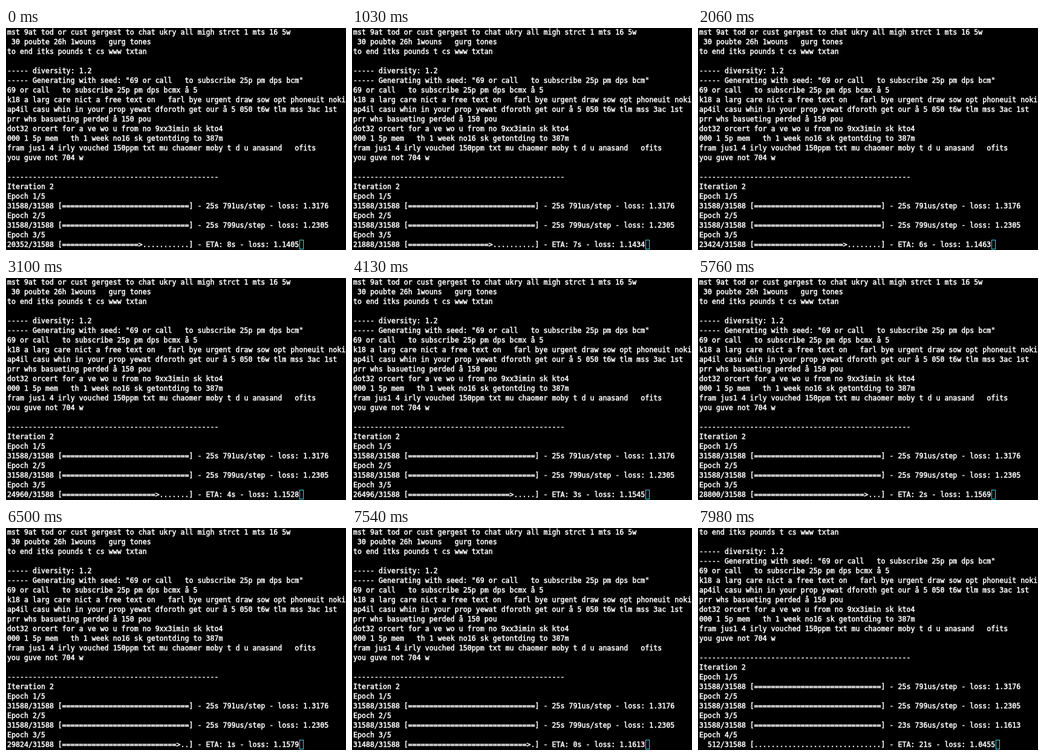
An HTML page for the animation above (8000 ms loop, 562 by 368 pixels).

```html
<!DOCTYPE html>
<html lang="en">
<head>
<meta charset="utf-8">
<title>Training log</title>
<style>
html, body { margin: 0; width: 100%; height: 100%; overflow: hidden; background: #000; }
#log {
  position: absolute; left: 2px; top: -1px; margin: 0; color: #fff;
  font: 11.627px/16px "DejaVu Sans Mono", monospace;
  font-variant-ligatures: none;
  -webkit-text-stroke: 0.5px #fff;
}
#cursor {
  position: absolute; top: 351px; width: 7px; height: 16px;
  box-sizing: border-box; border: 1px solid #36dce6;
}
</style>
</head>
<body>
<pre id="log"></pre>
<div id="cursor"></div>
<script>
const LOOP = 8000, TICK = 147.9, LEAD = 12;
const ROWS = 23, CELL = 7, LEFT = 2;
const SAMPLES = 31588, BATCH = 128, BATCHES = Math.ceil(SAMPLES / BATCH), WIDTH = 30;

// [tick, batches done, loss]
const progress = [
  [0, 159, 1.1405], [14, 183, 1.1463], [21, 195, 1.1528], [34, 217, 1.1560],
  [44, 233, 1.1579], [51, 246, 1.1613], [54, 251, 1.0455]
];

const history = `mst 9at tod or cust gergest to chat ukry all migh strct 1 mts 16 5w
 30 poubte 26h 1wouns   gurg tones
to end itks pounds t cs www txtan

----- diversity: 1.2
----- Generating with seed: "69 or call   to subscribe 25p pm dps bcm"
69 or call   to subscribe 25p pm dps bcmx å 5
k18 a larg care nict a free text on   farl bye urgent draw sow opt phoneuit noki
ap4il casu whin in your prop yewat dforoth get our å 5 050 t6w tlm mss 3ac 1st
prr whs basueting perded å 150 pou
dot32 orcert for a ve wo u from no 9xx3imin sk kto4
000 1 5p mem   th 1 week no16 sk getontding to 387m
fram jus1 4 irly vouched 150ppm txt mu chaomer moby t d u anasand   ofits
you guve not 704 w

${"-".repeat(50)}
Iteration 2
Epoch 1/5
${finished(25, 791, "1.3176")}
Epoch 2/5
${finished(25, 799, "1.2305")}
Epoch 3/5`.split("\n");

function finished(seconds, perStep, loss) {
  return `${SAMPLES}/${SAMPLES} [${"=".repeat(WIDTH)}] - ${seconds}s ${perStep}us/step - loss: ${loss}`;
}

function running(batches, loss, secondsPerSample) {
  const done = batches * BATCH;
  const filled = Math.floor(WIDTH * done / SAMPLES);
  const bar = (filled ? "=".repeat(filled - 1) + ">" : "").padEnd(WIDTH, ".");
  const eta = Math.floor((SAMPLES - done) * secondsPerSample);
  return `${String(done).padStart(5)}/${SAMPLES} [${bar}] - ETA: ${eta}s - loss: ${loss.toFixed(4)}`;
}

function stateAt(tick) {
  const next = Math.max(1, progress.findIndex(p => p[0] >= tick));
  const a = progress[next - 1], b = progress[next];
  const k = (tick - a[0]) / (b[0] - a[0]);
  return {
    batches: Math.round(a[1] + (b[1] - a[1]) * k),
    loss: a[2] + (b[2] - a[2]) * k
  };
}

function linesAt(tick) {
  const { batches, loss } = stateAt(tick);
  if (batches < BATCHES) return [...history, running(batches, loss, 0.000736)];
  return [
    ...history, finished(23, 736, "1.1613"), "Epoch 4/5",
    running(batches - BATCHES, 1.0455, 0.00069)
  ];
}

const log = document.getElementById("log");
const cursor = document.getElementById("cursor");
const start = performance.now();
let shown = -1;

function draw() {
  const time = (performance.now() - start) % LOOP;
  const tick = Math.min(54, Math.floor((time + LEAD) / TICK));
  if (tick !== shown) {
    shown = tick;
    const lines = linesAt(tick).slice(-ROWS);
    log.textContent = lines.join("\n");
    cursor.style.left = LEFT + CELL * lines[ROWS - 1].length + "px";
  }
  requestAnimationFrame(draw);
}
draw();
</script>
</body>
</html>
```
